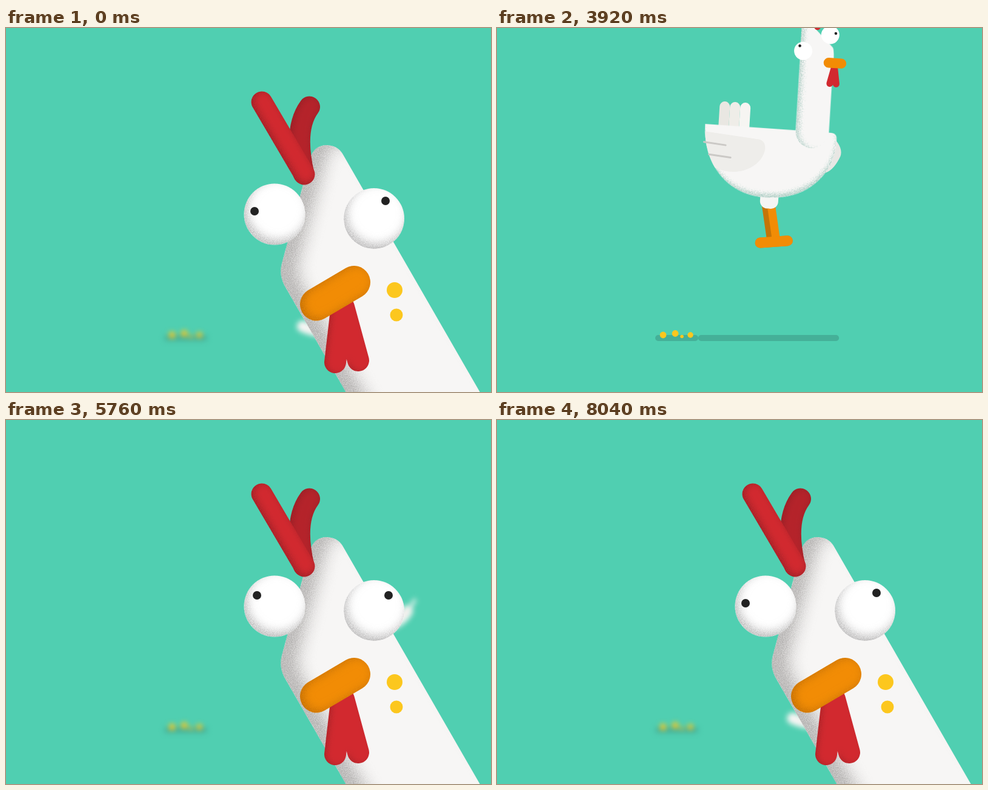
An HTML page that plays this animation: 800 by 600 pixels, repeating every 8080 ms.

```html
<!DOCTYPE html>
<html lang="en">
<head>
<meta charset="utf-8">
<title>Startled hen</title>
<style>
  html, body { margin: 0; width: 100%; height: 100%; overflow: hidden; background: #50cfb1; }
  svg { display: block; width: 800px; height: 600px; }
  .line { fill: none; stroke-linecap: round; stroke-linejoin: round; }
  .ground { fill: none; stroke: #45b098; stroke-width: 10; stroke-linecap: round; }
  .white { fill: #f7f6f5; }
  .eye { fill: #fff; }
  .pupil { fill: #222; }
  .corn { fill: #fcc71e; }
  .red { stroke: #d2292f; }
  .dark { stroke: #b5232a; }
  .beak { stroke: #f28c05; }
</style>
</head>
<body>
<svg viewBox="0 0 800 600">
  <defs id="defs">
    <clipPath id="bodyClip"><use href="#body"/></clipPath>
  </defs>

  <g id="floor">
    <path class="ground" d="M266 511H327"/>
    <g class="corn">
      <circle cx="274" cy="506" r="5.4"/><circle cx="294" cy="503.5" r="5.4"/>
      <circle cx="305" cy="508.5" r="2.8"/><circle cx="319" cy="506" r="4.7"/>
    </g>
  </g>
  <path id="shadow" class="ground"/>

  <g id="feather" class="line">
    <path d="M-26 -6Q1 9 24 1" stroke="#f6f5f3" stroke-width="19"/>
    <path d="M-13 -2Q10 6 33 -1" stroke="#e8e6e1" stroke-width="3"/>
    <path d="M33 -1L45 -5" stroke="#f6f5f3" stroke-width="5"/>
  </g>

  <g id="hen">
    <path id="footFar" class="line" stroke="#dc7d06" stroke-width="17"/>
    <path id="legFar" class="line" stroke="#c47508" stroke-width="17"/>
    <path id="legNear" class="line beak" stroke-width="17"/>
    <path id="legTone" class="line" stroke="#c47508" stroke-width="5"/>
    <path id="footNear" class="line beak" stroke-width="17"/>
    <g id="upper">
      <path id="thighs" class="line" stroke="#f5f5f3" stroke-width="24"/>
      <path id="farWing" fill="#e8e7e4" d="M344 345Q328 362 336 376Q346 398 360 401Z"/>
      <g id="tail" class="line" stroke-width="17">
        <path d="M517.5 301.5V340" stroke="#e9e7e2"/>
        <path d="M534.5 301.5V340" stroke="#efede8"/>
        <path d="M551.5 301.5V340" stroke="#f6f5f2"/>
      </g>
      <path id="body" class="white" filter="url(#bodyShade)" d="M352 334L560 332C560 400 515 447 454 447C410 447 375 432 352 392Q342 370 342 345Q342 334 352 334Z"/>
      <g clip-path="url(#bodyClip)">
        <path id="wing" fill="#eeedea" d="M434 350H537C537 385 515 410 480 410C448 410 423 388 423 364Q424 352 434 350Z"/>
      </g>
      <path id="quills" class="line" stroke="#cbc9c6" stroke-width="3" d="M500 371H536M489 390H525"/>
      <g id="eyeFarSlot"></g>
      <g filter="url(#neckShade)">
        <path id="neck" class="line" stroke="#f7f6f5" stroke-width="55"/>
        <path id="crown" class="white"/>
      </g>
      <g id="face">
        <g id="crumbs" class="corn"></g>
        <path id="combBack" class="line dark" stroke-width="10.5"/>
        <path id="combFront" class="line red" stroke-width="10.5"/>
        <path id="wattle" class="line red" stroke-width="11"/>
        <path id="beak" class="line beak" stroke-width="16.5"/>
        <g id="eyeNear"><circle class="eye" r="15"/><circle class="pupil" r="2.3"/></g>
        <g id="eyeFar"><circle class="eye" r="15"/><circle class="pupil" r="2.3"/></g>
      </g>
    </g>
  </g>
  <g id="flying" class="corn"></g>

  <g id="close">
    <path class="white" filter="url(#headShade)" d="M882 774L555 207Q546 193 528 193Q508 194 502 214L455 388Q450 406 459 424L661 774Z"/>
    <g id="bigCrumbs" class="corn"></g>
    <g filter="url(#wattleShade)"><path id="bigWattle" class="line red" stroke-width="36"/></g>
    <g filter="url(#beakShade)"><path id="bigBeak" class="line beak" stroke-width="54"/></g>
    <g id="bigComb">
      <g filter="url(#combShade)"><path class="line dark" stroke-width="35" d="M500.5 130Q474 166 491 240"/></g>
      <g filter="url(#combShade)"><path class="line red" stroke-width="35" d="M422 122L492 241"/></g>
    </g>
    <g id="eyeL"><circle class="eye" r="50.5" filter="url(#eyeShade)"/><circle class="pupil" r="7"/></g>
    <g id="eyeR"><circle class="eye" r="50" filter="url(#eyeShade)"/><circle class="pupil" r="7"/></g>
  </g>
</svg>

<script>
const LOOP = 8080, CUT = 78, LEAP = 3760, ENTER = 5200;
const $ = id => document.getElementById(id);
const set = (id, name, value) => $(id).setAttribute(name, value);
const show = (id, on) => { $(id).style.display = on ? '' : 'none'; };
const move = (id, x, y) => set(id, 'transform', `translate(${x} ${y})`);
const clamp = v => Math.max(0, Math.min(1, v));
const smooth = v => { v = clamp(v); return v * v * (3 - 2 * v); };
const NUM = /-?\d+(\.\d+)?/g;

// Blend two paths or coordinate lists that share the same layout.
function mix(a, b, k) {
  const ends = b.match(NUM);
  let i = 0;
  return a.replace(NUM, v => (+v + (ends[i++] - v) * k).toFixed(2));
}

// Eased value from [time, value] stops.
function ease(t, stops) {
  let i = 0;
  while (i < stops.length - 2 && t > stops[i + 1][0]) i++;
  const [t0, a] = stops[i], [t1, b] = stops[i + 1];
  return a + (b - a) * smooth((t - t0) / (t1 - t0));
}

// Smooth curve through rows of [time, ...values].
function curve(t, rows) {
  let i = 0;
  while (i < rows.length - 2 && t > rows[i + 1][0]) i++;
  const a = rows[i], b = rows[i + 1], p = rows[i - 1] || a, n = rows[i + 2] || b;
  const h = b[0] - a[0], u = clamp((t - a[0]) / h), w = 1 - u;
  return a.slice(1).map((v, c) => {
    c++;
    const m0 = (b[c] - p[c]) / (b[0] - p[0]) * h, m1 = (n[c] - a[c]) / (n[0] - a[0]) * h;
    return v * (1 + 2 * u) * w * w + m0 * u * w * w + b[c] * u * u * (3 - 2 * u) - m1 * u * u * w;
  });
}

// Grainy inner shadow; mixing = arithmetic weights for shade and noise.
function shade(id, dx, dy, blur, colour, opacity, mixing, region) {
  const [x, y, w, h] = region || ['-5%', '-5%', '110%', '110%'];
  const [k1, k2, k3, k4] = mixing;
  $('defs').insertAdjacentHTML('beforeend', `
    <filter id="${id}" filterUnits="${region ? 'userSpaceOnUse' : 'objectBoundingBox'}"
      x="${x}" y="${y}" width="${w}" height="${h}" color-interpolation-filters="sRGB">
      <feGaussianBlur in="SourceAlpha" stdDeviation="${blur}"/>
      <feOffset id="${id}Offset" dx="${dx}" dy="${dy}" result="light"/>
      <feComposite in="SourceAlpha" in2="light" operator="out" result="inner"/>
      <feTurbulence type="fractalNoise" baseFrequency=".8" numOctaves="2" seed="4"/>
      <feColorMatrix values="0 0 0 0 0  0 0 0 0 0  0 0 0 0 0  0 0 0 3 -1" result="noise"/>
      <feComposite in="inner" in2="noise" operator="arithmetic" k1="${k1}" k2="${k2}" k3="${k3}" k4="${k4}" result="grain"/>
      <feFlood flood-color="${colour}" flood-opacity="${opacity}"/>
      <feComposite in2="grain" operator="in"/>
      <feComposite in2="SourceGraphic" operator="atop"/>
    </filter>`);
}
const SOFT = [.7, .65, 0, 0], SPECK = [0, 1.5, 1, -1.15];
shade('bodyShade', 2, -8, 5, '#8fbcb0', .7, SPECK, [335, 325, 235, 130]);
shade('neckShade', 8, 0, 6, '#8fbcb0', .65, SPECK, [235, 130, 190, 360]);
shade('headShade', 26, -4, 14, '#a9a6a5', .8, SOFT, [400, 150, 520, 640]);
shade('eyeShade', 5, -8, 8, '#aaa9a9', .7, SOFT);
shade('combShade', 3, -2, 7, '#861c22', .75, SOFT, [395, 95, 130, 170]);
shade('beakShade', 5, -2, 8, '#b06404', .7, SOFT, [410, 380, 200, 150]);
shade('wattleShade', 4, 0, 5, '#8f1d22', .5, SOFT, [470, 430, 140, 170]);

// Each part: pecking pose, upright pose.
const POSE = {
  neck: ['M386 366C362 330 340 338 338 385C336 440 322 462 275 431',
         'M383 334C383 320 383 305 383 290C383 265 383 240 383 212'],
  crown: ['M275 435L275 435Q275 435 275 435L275 435Q275 435 275 435Z',
          'M411 216L411 158Q410 146 400 153L358 193Q355 196 355 216Z'],
  combBack: ['M246 400Q248 415 266 424', 'M404 131Q390 138 387 158'],
  combFront: ['M234 415.5Q245 428 271 427', 'M385 117Q385 140 385 161'],
  wattle: ['M300 474L304.5 494M301 474L313 491', 'M353 226L359 253M353 226L348.5 253'],
  beak: ['M295.5 466.5L288 489', 'M363 219L342 219']
};
const EYES = {
  eyeFar: ['264 464 255 465', '363 173 354 170'],
  eyeNear: ['303 440 309 433', '406 202 412 194']
};
const NECK_BOB = 'M386 366C362 330 340 338 338 380C336 428 322 446 270 417';

// Each part: standing, leaping.
const LEGS = {
  legFar: ['M425 455L428 500', 'M451 455L439 513'],
  legNear: ['M453 455L455 500', 'M446 455L434 513'],
  legTone: ['M447 462L449 493', 'M452 462L442 510'],
  footFar: ['M402 503L440 503', 'M412.7 516L457.5 522'],
  footNear: ['M429 503L474 503', 'M412.7 516L457.5 522'],
  thighs: ['M425 440L425 449M452 440L452 449', 'M444 440L444 453M450 440L450 453']
};

// Close-up: resting face, face turned to the left.
const TURN = {
  bigWattle: ['M553 465L543 551M557 460L581 548', 'M515 490L501 571M522 482L539 569'],
  bigBeak: ['M512 455.5L574 419', 'M446 492L538 440']
};

const DRIFT = [
  [4100, 505, 150, -20], [4600, 450, 222, 0], [4960, 327, 232, 24], [5380, 490, 318, 0],
  [5790, 645, 332, -40], [6200, 525, 400, -12], [6600, 335, 403, -8], [6860, 308, 400, 12],
  [7400, 400, 490, 0], [7850, 503, 497, -4], [8040, 514, 496, -4], [8160, 518, 496, -4]
];

const dots = list => list.map(([x, y, r]) => `<circle cx="${x}" cy="${y}" r="${r}"/>`).join('');

function placeEye(id, [x, y, px, py]) {
  move(id, x, y);
  $(id).lastElementChild.setAttribute('transform', `translate(${px - x} ${py - y})`);
}

function peck(t) {
  const start = t < 1340 ? 560 : 1400, n = t < 1340 ? 3 : 1;
  const u = (t - start) / 240;
  return u > 0 && u < n ? Math.sin(Math.PI * u) ** 2 : 0;
}

function drawHen(t) {
  const up = ease(t, [[1960, 0], [2440, 1]]);
  const bob = peck(t);
  const leap = Math.max(0, t - LEAP), away = t >= LEAP, fly = clamp(leap / 160);
  const crouch = away ? 0 : ease(t, [[3280, 0], [3600, 5]]);

  for (const id in POSE) set(id, 'd', mix(...POSE[id], up));
  if (bob) set('neck', 'd', mix(POSE.neck[0], NECK_BOB, bob));
  move('face', -5 * bob, -14 * bob);
  move('eyeFarSlot', -5 * bob, -14 * bob);

  const look = away ? 0 : ease(t, [[2480, 0], [2640, 7], [2960, 7], [3100, -1], [3400, -1], [3600, 0]]);
  for (const id in EYES) {
    const at = mix(...EYES[id], up).split(' ').map(Number);
    at[2] += id === 'eyeFar' ? look * 1.6 : -look;
    placeEye(id, at);
  }
  const slot = up > .5 ? $('face') : $('eyeFarSlot');
  if ($('eyeFar').parentNode !== slot) slot.append($('eyeFar'));

  const spots = mix('319 461 324 470', '378.5 232 373.5 243', up).split(' ');
  $('crumbs').innerHTML = t > 800 && !away
    ? dots([[spots[0], spots[1], 3.8], [spots[2], spots[3], 3]]) : '';

  for (const id in LEGS) set(id, 'd', mix(...LEGS[id], fly));
  move('upper', 0, crouch);
  // The tail keeps its light side to the right when the hen turns round.
  if (away) set('tail', 'transform', `translate(${1069 - 22 * fly}) scale(-1 1)`);
  else move('tail', 0, t < 1340 ? -5 * bob : 0);
  set('wing', 'transform', `translate(${37 * fly} ${-2 * fly}) rotate(${-5 * fly} 480 380)`);
  set('quills', 'transform', `translate(${25 * fly} ${-7 * fly}) rotate(${-5 * fly} 510 380)`);
  set('farWing', 'opacity', fly);
  set('neckShadeOffset', 'dx', away ? -8 : 8);

  const s = leap / 160;
  set('hen', 'transform', away
    ? `translate(${440 + 16 * s ** 1.9} ${447 - 166 * s ** .75}) rotate(${3.5 * fly}) scale(-1 1) translate(-440 -447)`
    : '');
  show('hen', t < 4600);

  const half = Math.min(84 + 27 * s, 146), mid = 444.5 + 3.5 * fly;
  set('shadow', 'd', `M${mid - half} 511H${mid + half}`);
  set('shadow', 'opacity', 1 - clamp((leap - 200) / 200));

  $('flying').innerHTML = dots([800, 1040, 1280].map(t0 => t - t0)
    .filter(u => u > 0 && u < 170)
    .map(u => [278 - .45 * u, 502 - .3 * u + .0014 * u * u, 3.3]));
}

function drawClose(t) {
  const inward = ease(t, [[ENTER, 0], [5480, 1.054], [5680, 1]]);
  move('close', 300 * (1 - inward), 520 * (1 - inward));

  const turn = ease(t, [[6300, 0], [6540, 1], [6800, 1], [7080, 0]]);
  const lag = ease(t, [[6300, 0], [6560, 1], [6840, 1], [7200, 0]]);
  for (const id in TURN) set(id, 'd', mix(...TURN[id], turn));
  move('bigComb', -10 * lag, 6 * lag);
  $('bigCrumbs').innerHTML = dots([
    [641 - 9 * turn, 432 + 5 * turn, 13], [644 - 26 * turn, 473 + 15 * turn, 10.5]]);

  const eyes = [['eyeL', 443 - 36 * turn, 307 + 21 * turn], ['eyeR', 607 - 54 * turn, 314 + 26 * turn]];
  const left = curve(t, [[5300, -32, -4], [5760, -29, -18], [6250, -26, -20], [6600, -30, -17], [7000, -32, -9], [7600, -33, -5]]);
  const right = curve(t, [[5300, 14, -30], [5760, 24, -25], [6200, 25, -22], [6600, -24, 23], [6800, -22, 20], [7080, 19, -29], [7200, 19, -29]]);
  [left, right].forEach(([px, py], i) => {
    const [id, x, y] = eyes[i];
    placeEye(id, [x, y, x + px, y + py]);
  });
}

function draw(t) {
  if (t < CUT) t += LOOP;
  const close = t >= ENTER;
  show('close', close);
  show('shadow', !close);
  show('flying', !close);
  show('feather', t >= 4100);
  drawHen(t);
  if (close) drawClose(t);

  const [x, y, tilt] = curve(t, DRIFT);
  set('feather', 'transform', `translate(${x} ${y}) rotate(${tilt})`);
  const blur = 4.5 * smooth((t - ENTER) / 400);
  for (const id of ['floor', 'feather']) $(id).style.filter = blur ? `blur(${blur}px)` : '';
}

const start = performance.now();
function tick() {
  draw((performance.now() - start) % LOOP);
  requestAnimationFrame(tick);
}
tick();
</script>
</body>
</html>
```
